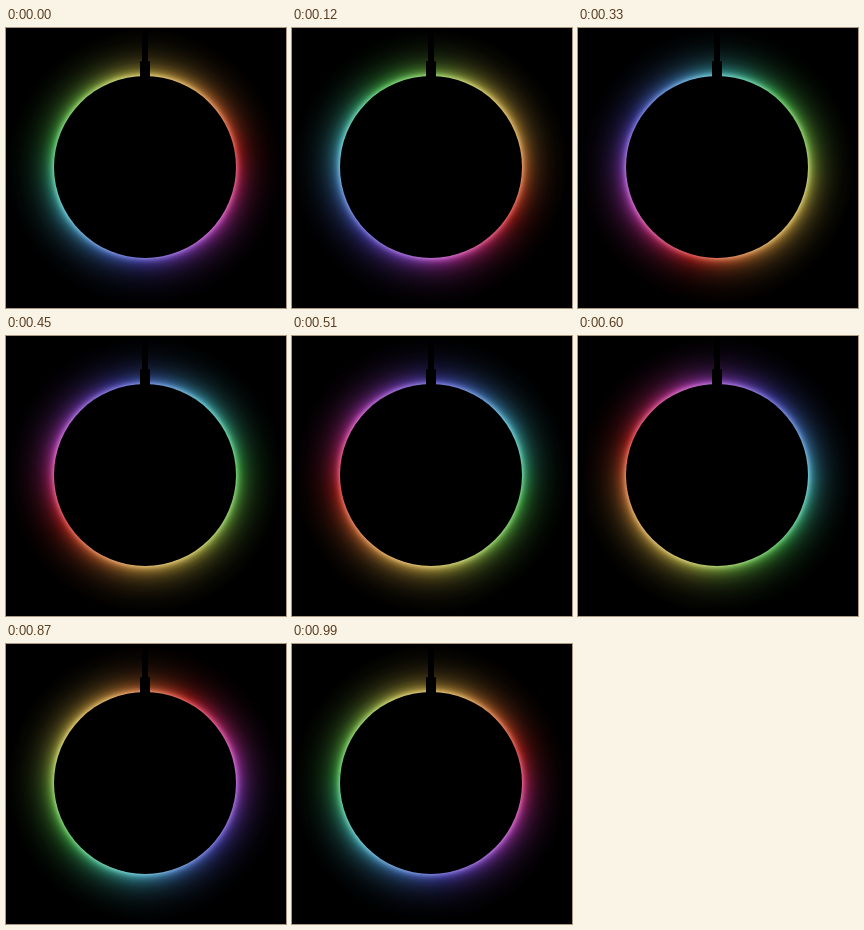
Recreate the animation shown at these times as an HTML page. Size 280 by 280 pixels, loop 1020 ms.

```html
<!DOCTYPE html>
<html lang="en">
<head>
<meta charset="utf-8">
<title>Colour ring</title>
<style>
  html, body { margin: 0; width: 100%; height: 100%; overflow: hidden; background: #000; }
  .stage { position: relative; width: 280px; height: 280px; overflow: hidden; background: #000; }
  .stage > * { position: absolute; }
  .hues {
    left: -11px; top: -11px; width: 300px; height: 300px; border-radius: 50%;
    background: conic-gradient(
      #d8bc48 0deg, #e0a040 30deg, #e46a30 55deg, #e42a26 80deg,
      #dc2c78 104deg, #cc3cc4 128deg, #8c46d6 156deg, #5552d8 184deg,
      #4a86d8 212deg, #48c0d2 240deg, #42c89a 262deg, #48c850 286deg,
      #80cc48 318deg, #c0c84a 342deg, #d8bc48 360deg);
  }
  /* bright rim, then light falling off outwards */
  .rim, .shade { inset: 0; }
  .rim {
    background: radial-gradient(circle at 139px 139px,
      rgba(255,255,255,.26) 91px, rgba(255,255,255,.1) 94px, transparent 98px);
  }
  .shade {
    background: radial-gradient(circle at 139px 139px,
      rgba(0,0,0,.04) 91px, rgba(0,0,0,.2) 93px, rgba(0,0,0,.42) 96px,
      rgba(0,0,0,.6) 100px, rgba(0,0,0,.74) 105px, rgba(0,0,0,.84) 111px,
      rgba(0,0,0,.91) 118px, rgba(0,0,0,.96) 126px, #000 138px);
  }
  .disc { left: 48px; top: 48px; width: 182px; height: 182px; border-radius: 50%; background: #000; }
  .plug { left: 134px; top: 33px; width: 10px; height: 17px; border-radius: 1px 1px 0 0; background: #000; }
  .cable { left: 136px; top: 0; width: 6px; height: 34px; background: #000; }
</style>
</head>
<body>
<div class="stage">
  <div class="hues"></div>
  <div class="rim"></div>
  <div class="shade"></div>
  <div class="disc"></div>
  <div class="cable"></div>
  <div class="plug"></div>
</div>
<script>
  const LOOP = 1020, STEP = 30;
  document.querySelector('.hues').animate(
    [{ transform: 'rotate(0deg)' }, { transform: 'rotate(360deg)' }],
    { duration: LOOP, iterations: Infinity, easing: `steps(${LOOP / STEP}, end)` }
  );
</script>
</body>
</html>
```
